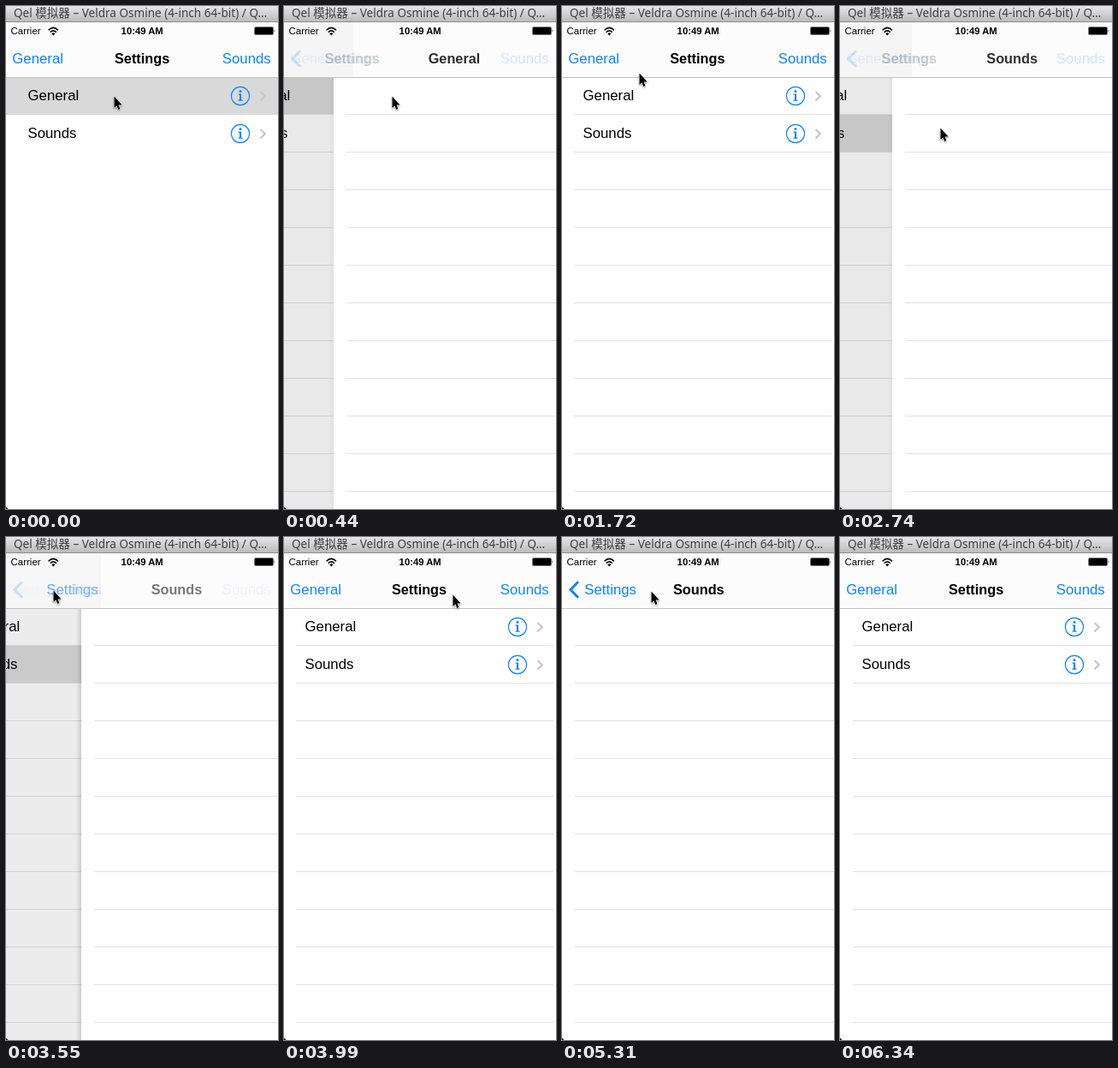
Recreate the animation shown at these times as an HTML page. Size 318 by 587 pixels, loop 6.93 s.

```html
<!DOCTYPE html>
<html lang="en">
<head>
<meta charset="utf-8">
<title>Navigation demo</title>
<style>
  html, body { margin: 0; width: 100%; height: 100%; overflow: hidden; background: #fff; }
  svg { display: block; width: 318px; height: 587px; overflow: hidden; }
  text { font: 16.8px "Liberation Sans", Arial, sans-serif; white-space: pre; }
  .window { font: 13.55px "Noto Sans", "Noto Sans CJK SC", "Noto Sans CJK", sans-serif; fill: #404040; }
  .status { font-size: 11.5px; }
  .clock { font-size: 11.3px; font-weight: bold; }
  .title { font-size: 16.3px; font-weight: bold; }
  .blue { fill: #0b84ff; }
  .stroke { fill: none; stroke: #0b84ff; }
  .lines { fill: none; stroke: #e3e3e3; shape-rendering: crispEdges; }
</style>
</head>
<body>
<svg viewBox="0 0 318 587">
  <defs>
    <linearGradient id="chrome" x2="0" y2="1">
      <stop stop-color="#e6e6e6"/><stop offset="1" stop-color="#b9b9b9"/>
    </linearGradient>
    <linearGradient id="edge">
      <stop stop-opacity="0"/><stop offset="1" stop-opacity=".18"/>
    </linearGradient>
    <g id="accessory">
      <circle class="stroke" cx="274" cy="21" r="10.6" stroke-width="1.1"/>
      <circle class="blue" cx="274" cy="15.6" r="1.5"/>
      <path class="blue" d="M271.6 18.6H275.1V25.6H276.6V26.7H271.5V25.6H273V19.7H271.6Z"/>
      <path d="M297.5 16L302.8 21.2L297.5 26.4" fill="none" stroke="#c7c7cc" stroke-width="2.2"/>
    </g>
  </defs>

  <rect width="318" height="587" fill="#fefefe"/>
  <g id="root">
    <rect id="sel" y="84" width="318" height="43" fill="#d9d9d9"/>
    <path class="lines" id="rootLines"/>
    <text x="25.5" y="110">General</text>
    <text x="25.5" y="154">Sounds</text>
    <use href="#accessory" y="84"/>
    <use href="#accessory" y="128"/>
  </g>
  <rect id="dim" y="84" width="318" height="503"/>
  <g id="page">
    <rect id="shadow" x="-6" y="84" width="6" height="503" fill="url(#edge)"/>
    <rect y="84" width="318" height="503" fill="#fefefe"/>
    <path class="lines" id="pageLines"/>
  </g>

  <rect y="19" width="318" height="64" fill="#fcfcfc"/>
  <rect id="tint" y="19" height="64"/>
  <path d="M0 83.5H318" stroke="#c2c2c2" shape-rendering="crispEdges"/>
  <text id="left" class="blue" x="7.3" y="67">General</text>
  <text id="right" class="blue" x="252.8" y="67">Sounds</text>
  <text id="rootTitle" class="title" y="67">Settings</text>
  <path id="chevron" class="stroke" d="M19 52.2L10 61.5L19 70.8" stroke-width="2.9"/>
  <text id="back" class="blue" y="67">Settings</text>
  <text id="title" class="title" y="67" text-anchor="middle"></text>

  <text class="status" x="5.5" y="33.3">Carrier</text>
  <path d="M49.6 28.2Q55.3 22.6 61 28.2M51.8 30.6Q55.3 27.2 58.8 30.6" fill="none" stroke="#000" stroke-width="1.6"/>
  <path d="M53.3 32.2Q55.3 30.5 57.3 32.2L55.3 34.4Z"/>
  <text class="clock" x="159.2" y="33.2" text-anchor="middle">10:49 AM</text>
  <rect x="290.5" y="24.5" width="22" height="9" rx="1.6" stroke="#777" stroke-width="1"/>
  <path d="M313.6 27.3Q315.2 29 313.6 30.7Z"/>

  <rect width="318" height="19" fill="url(#chrome)"/>
  <path d="M0 18.5H318" stroke="#8f8f8f" shape-rendering="crispEdges"/>
  <text class="window" x="9" y="13">Qel 模拟器 – Veldra Osmine (4-inch 64-bit) / Q…</text>
  <path d="M0 584.5L2.5 587H0Z"/>

  <path id="cursor" d="M.5 .5V14L3.4 11.3L5.3 16L7.4 15.1L5.5 10.5H9.6Z" stroke="#fff" stroke-width="1" paint-order="stroke"
    style="filter: drop-shadow(0 1px 1px #0006)"/>
</svg>
<script>
const LOOP = 6930, WIDTH = 318, RATE = 0.013;

const bursts = [[290, 1010, 6], [1280, 2300, 8], [2600, 3550, 8], [3690, 4720, 8], [4870, 5900, 8], [6050, 6340, 3]];
const ticks = [0];
for (const [a, b, n] of bursts)
  for (let i = 0; i < n; i++) ticks.push(Math.ceil((a + (b - a) * i / (n - 1)) / 10) * 10);

// [start, pushing, page title]
const moves = [
  [200, true, "General"], [1168, false, "General"],
  [2505, true, "Sounds"], [3470.4, false, "Sounds"],
  [4261.5, true, "Sounds"], [5250, false, "Sounds"]
];

// [time, x, y]
const trail = [
  [0, 126, 105], [720, 126, 105], [1010, 71, 53], [1430, 71, 53], [1720, 90, 78],
  [2010, 117, 142], [3020, 117, 142], [3440, 55, 62], [3700, 55, 62], [4140, 271, 69],
  [4870, 271, 69], [5250, 60, 62], [5460, 60, 62], [5900, 170, 251], [6050, 205, 380],
  [6200, 262, 555], [6340, 262, 600], [LOOP, 262, 600]
];

const $ = id => document.getElementById(id);
const set = (id, attrs) => { for (const k in attrs) $(id).setAttribute(k, attrs[k]); };
const shift = (x, y = 0) => `translate(${x} ${y})`;

let grid = "";
for (let y = 126.5; y < 587; y += 44) grid += `M15 ${y}H${WIDTH}`;
set("rootLines", { d: grid });
set("pageLines", { d: grid });

// Critically damped spring: distance left to travel
function remaining(ms) {
  const u = ms * RATE, r = (1 + u) * Math.exp(-u);
  return r < 0.003 ? 0 : r;
}

function cursorAt(t) {
  const i = trail.findIndex(k => k[0] > t);
  const [t0, x0, y0] = trail[i - 1], [t1, x1, y1] = trail[i];
  const f = (t - t0) / (t1 - t0);
  return [Math.round(x0 + (x1 - x0) * f), Math.round(y0 + (y1 - y0) * f)];
}

// p: 0 shows the list, 1 shows the pushed page
function drawBar(p, pushing, name, x) {
  const r = 1 - p;
  const off = pushing ? r * (100 + 90 * r * p) : 100 * r ** 1.22;
  const fade = pushing ? r : r * r;
  set("tint", { width: Math.min(WIDTH, x + 23), opacity: p < 1 ? 0.035 * p : 0 });
  set("left", { opacity: fade ** 1.5 });
  set("right", { opacity: fade });
  set("rootTitle", { x: 27 + off, opacity: fade });
  set("back", { x: 26.3 + off, opacity: pushing ? p ** 10 : p * p });
  set("chevron", { opacity: pushing ? p ** 8 : p ** 5 });
  set("title", { x: 159.8 + 1.9 * off, opacity: pushing ? p : p * p });
  $("title").textContent = name;
}

function draw(now) {
  const time = now % LOOP;
  const t = ticks.filter(k => k <= time).pop();
  const [start, pushing, name] = moves.filter(m => m[0] <= t).pop() || [0, false, "General"];
  const r = start ? remaining(t - start) : 0;
  const p = pushing ? 1 - r : r;
  const x = Math.round((1 - p) * WIDTH);

  const general = t < 1800, sounds = t >= 2300 && t < 4261;
  const chosen = start === 0 || (t >= 2300 && t < 2505) || pushing;
  set("sel", {
    y: general ? 84 : 127,
    opacity: general || sounds ? (chosen ? 1 : Math.min(1, p * 1.4)) : 0
  });
  set("rootLines", { opacity: t ? 1 : 0 });
  set("root", { transform: shift(Math.round(-0.3 * WIDTH * p)) });
  set("dim", { opacity: 0.1 * p });
  set("shadow", { opacity: r });
  if (!pushing) set("shadow", { opacity: p });
  set("page", { transform: shift(x), visibility: p ? "visible" : "hidden" });
  drawBar(p, pushing, name, x);
  set("cursor", { transform: shift(...cursorAt(t)) });
}

function frame() {
  draw(performance.now());
  requestAnimationFrame(frame);
}
frame();
</script>
</body>
</html>
```
